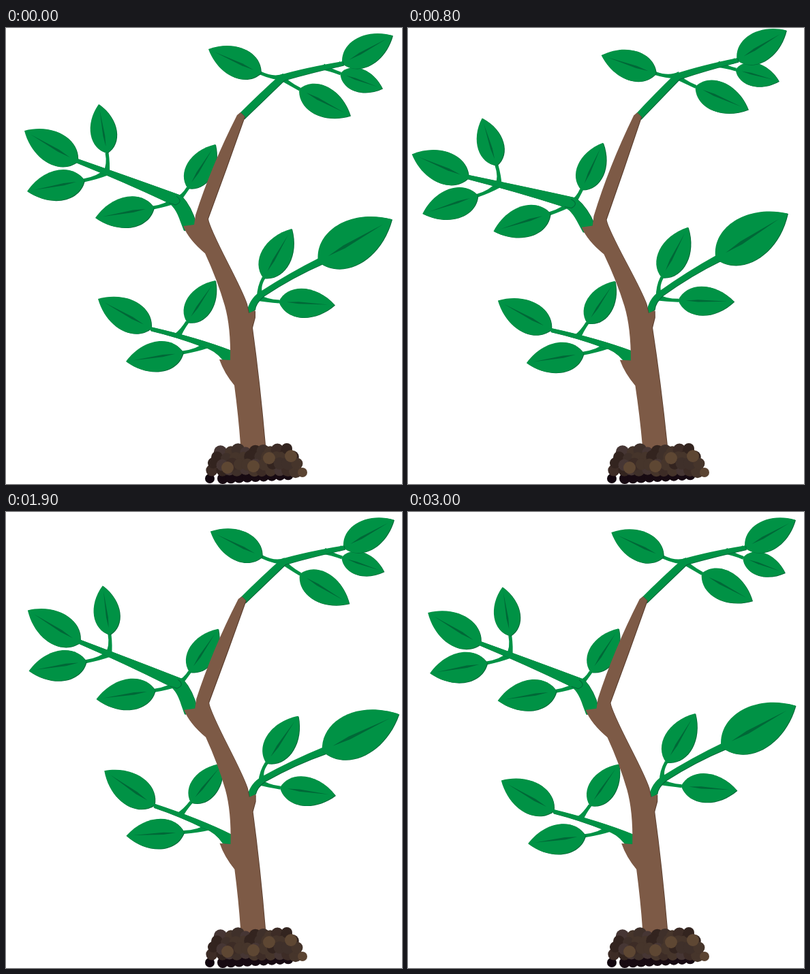
An HTML page with a canvas for the animation above (3.1 s loop, 581 by 670 pixels).

```html
<!DOCTYPE html>
<html>
<head>
<meta charset="utf-8">
<title>Swaying sapling</title>
<style>
  html, body { margin: 0; width: 100%; height: 100%; overflow: hidden; background: #fff; }
  canvas { display: block; }
</style>
</head>
<body>
<canvas width="581" height="670"></canvas>
<script>
const ctx = document.querySelector('canvas').getContext('2d');
const LOOP = 3100, STEP = 100, LEFT = 800, RIGHT = 2350;
const GREEN = '#009245', DARK_GREEN = '#006837', BROWN = '#7d5a46', DARK_BROWN = '#5b3f30';
let time = 0;

// Linear sway: rest, left extreme, right extreme, rest.
function sway(left, right) {
  if (time < LEFT) return left * time / LEFT;
  if (time < RIGHT) return left + (right - left) * (time - LEFT) / (RIGHT - LEFT);
  return right * (LOOP - time) / (LOOP - RIGHT);
}

// Rotate everything drawn inside around (x, y); angles in degrees.
function joint(x, y, left, right, draw) {
  ctx.save();
  ctx.translate(x, y);
  ctx.rotate(sway(left, right) * Math.PI / 180);
  ctx.translate(-x, -y);
  draw();
  ctx.restore();
}

function shape(path, color, shade) {
  ctx.save();
  ctx.translate(1, 0.6);
  ctx.fillStyle = shade;
  ctx.fill(path);
  ctx.restore();
  ctx.fillStyle = color;
  ctx.fill(path);
}

// Tapered stalk from (sx, sy) that meets the leaf base in the leaf's direction.
function stalk(sx, sy, bx, by, angle) {
  const reach = 0.6 * Math.hypot(bx - sx, by - sy);
  const cx = bx - reach * Math.cos(angle), cy = by - reach * Math.sin(angle);
  const start = Math.atan2(cy - sy, cx - sx);
  const nx = -Math.sin(angle), ny = Math.cos(angle);
  const mx = -Math.sin(start) * 5, my = Math.cos(start) * 5;
  ctx.fillStyle = GREEN;
  ctx.beginPath();
  ctx.moveTo(sx + mx, sy + my);
  ctx.quadraticCurveTo(cx + nx * 2, cy + ny * 2, bx + nx * 2.5, by + ny * 2.5);
  ctx.lineTo(bx - nx * 2.5, by - ny * 2.5);
  ctx.quadraticCurveTo(cx - nx * 2, cy - ny * 2, sx - mx, sy - my);
  ctx.fill();
}

// Stalk start, leaf base, leaf tip.
function leaf(sx, sy, bx, by, tx, ty) {
  const length = Math.hypot(tx - bx, ty - by), angle = Math.atan2(ty - by, tx - bx);
  stalk(sx, sy, bx, by, angle);
  const blade = new Path2D(), vein = new Path2D();
  const at = new DOMMatrix().translate(bx, by).rotate(angle * 180 / Math.PI).scale(length);
  blade.addPath(new Path2D('M-.01,0 C.13,-.34 .64,-.36 1,0 C.64,.36 .13,.34 -.01,0Z'), at);
  vein.addPath(new Path2D('M.13,0 L.35,-.02 L.88,0 L.35,.02Z'), at);
  shape(blade, GREEN, DARK_GREEN);
  ctx.fillStyle = DARK_GREEN;
  ctx.fill(vein);
}

const stems = {
  top: new Path2D('M341,127 L349,134 L408,77 Q450,65 495,55 L494,49 Q440,58 402,69 Q372,96 341,127Z'),
  upper: new Path2D('M261,298 L279,288 Q272,262 257,246 Q205,227 105,192 L103,198 Q170,225 236,256 Q248,261 256,285Z'),
  right: new Path2D('M356,420 L365,414 Q366,404 378,394 Q420,366 466,346 L461,337 Q415,360 372,388 Q357,398 353,418Z'),
  lower: new Path2D('M318,488 L332,488 L331,474 Q282,455 212,439 L212,445 Q250,454 287,468 Q305,472 318,488Z')
};
const elbow = new Path2D('M250,247 Q261,255 249,260 L239,257');
const trunk = new Path2D(`M345,630 L344,612 Q341,570 335,525 Q320,507 313,487 L329,488
  Q330,440 321,408 Q310,370 292,331 Q268,311 260,291 L276,289 L278,275 Q301,203 339,128 L344,124 L350,130
  L323,206 L296,280 Q297,290 325,345 Q348,390 353,405 L356,419 L365,415 L365,425 L361,440
  Q372,520 380,612 L381,630Z`);

function stem(name) { shape(stems[name], GREEN, DARK_GREEN); }

function tree() {
  joint(345, 128, -1.15, 0.35, () => {
    joint(390, 67, -4.2, 3.7, () => leaf(408, 72, 373, 66, 297, 31));
    joint(406, 72, -2, 5.3, () => leaf(402, 71, 431, 90, 505, 129));
    joint(470, 58, -2.6, -0.5, () => leaf(465, 57, 491, 67, 552, 89));
    leaf(488, 53, 494, 52, 567, 11);
    stem('top');
  });
  joint(270, 290, -6.6, 4.5, () => {
    leaf(102, 195, 104, 196, 27, 151);
    leaf(147, 213, 148, 183, 136, 112);
    leaf(147, 212, 114, 224, 31, 240);
    leaf(248, 253, 216, 264, 131, 279);
    leaf(252, 252, 267, 235, 307, 171);
    stem('upper');
    ctx.strokeStyle = DARK_GREEN;
    ctx.lineWidth = 1;
    ctx.stroke(elbow);
  });
  joint(359, 416, -1.5, 6.4, () => {
    leaf(373, 394, 378, 367, 419, 295);
    leaf(370, 396, 401, 402, 482, 407);
    stem('right');
    leaf(458, 343, 459, 343, 566, 281);
  });
  joint(326, 482, 0.3, 7.2, () => {
    leaf(252, 452, 266, 432, 307, 371);
    leaf(294, 466, 259, 477, 176, 490);
    leaf(210, 441, 212, 441, 135, 398);
    stem('lower');
  });
  shape(trunk, BROWN, DARK_BROWN);
}

function clod(x, y, r, color) {
  ctx.fillStyle = color;
  ctx.beginPath();
  ctx.arc(x, y, r, 0, 7);
  ctx.fill();
}

const SOIL = ['#3d2c26', '#46352b', '#33241f', '#463634', '#3f302a'];
function soil() {
  let seed = 11;
  const random = () => (seed = seed * 16807 % 2147483647) / 2147483647;
  clod(299, 662, 7, '#12060f');
  for (let x = 318; x < 415; x += 12) clod(x, 662 - (x - 318) * 0.06, 8, '#170a12');
  for (const [y, from, to] of [[650, 304, 434], [622, 316, 418], [631, 311, 428], [641, 306, 433]])
    for (let x = from; x <= to; x += 12)
      clod(x + random() * 4 - 2, y + random() * 4 - 2, 8 + random() * 2, SOIL[Math.floor(random() * SOIL.length)]);
  clod(412, 618, 8, '#33241f');
  clod(435, 653, 7, '#5b4432');
  for (const [x, y] of [[325, 646], [363, 644], [386, 632], [418, 629]]) clod(x, y, 9, '#5e4733');
}

function frame(now) {
  time = Math.floor(now % LOOP / STEP) * STEP;
  ctx.fillStyle = '#fff';
  ctx.fillRect(0, 0, 581, 670);
  joint(362, 625, -0.9, 0.65, tree);
  soil();
  requestAnimationFrame(frame);
}
requestAnimationFrame(frame);
</script>
</body>
</html>
```
